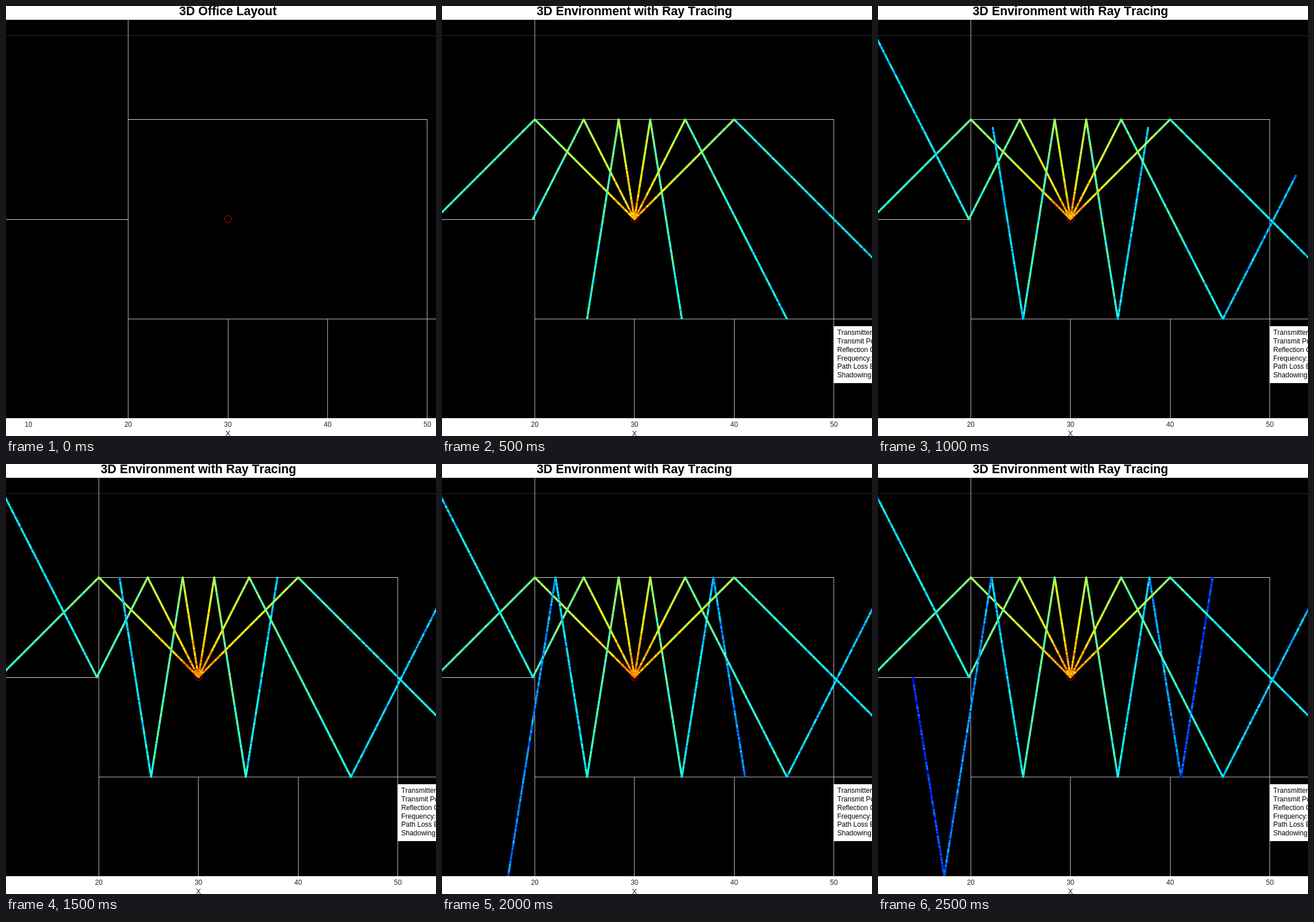
An HTML page with a canvas that plays this animation: 748x748 px, repeating every 3 s.

```html
<!DOCTYPE html>
<html lang="en">
<head>
<meta charset="utf-8">
<title>Ray tracing in an office layout</title>
<style>
  html, body { margin: 0; width: 100%; height: 100%; overflow: hidden; background: #fff; }
  canvas { display: block; width: 748px; height: 748px; }
</style>
</head>
<body>
<canvas id="stage" width="748" height="748"></canvas>
<script>
const ctx = document.getElementById('stage').getContext('2d');
const SIZE = 748, STEP_MS = 500, STEPS = 6;
const UNIT = 17.345;
const PLOT_TOP = 24, TOP = 197.3, MID = 370.7, LOW = 544.2, BOTTOM = 717;
const FONT = '"Liberation Sans", Arial, sans-serif';
const tan = degrees => Math.tan(degrees * Math.PI / 180);

// Each ray advances sideways at a fixed slope and turns at these heights.
const RAYS = [
  { slope: -tan(45), turns: [TOP, LOW], loss: 0 },
  { slope: -tan(27), turns: [TOP, MID, PLOT_TOP], loss: 0 },
  { slope: -tan(9), turns: [TOP, LOW, TOP, BOTTOM, MID], loss: 0 },
  { slope: tan(9), turns: [TOP, LOW, TOP, LOW, TOP], loss: 0 },
  { slope: tan(27), turns: [TOP, LOW, TOP], loss: 0.02 },
  { slope: tan(45), turns: [TOP, LOW], loss: 0.05 }
];

// Visible segments, reach in pixels and colour shift per step.
const STAGES = [
  null,
  { segments: 2, reach: Infinity, shift: -0.025 },
  { segments: 3, reach: 864.4, shift: -0.02 },
  { segments: 3, reach: Infinity, shift: 0 },
  { segments: 4, reach: Infinity, shift: -0.005 },
  { segments: 5, reach: Infinity, shift: -0.005 }
];

const LEGEND = ['Transmitter Height: 1 m', 'Transmit Power: 20 dBm', 'Reflection Coefficient: 0.7',
  'Frequency: 2.4 GHz', 'Path Loss Exponent: 2', 'Shadowing Deviation: 3 dB'];

function seeded(seed) {
  return () => {
    seed = (seed + 0x6D2B79F5) | 0;
    let t = Math.imul(seed ^ (seed >>> 15), 1 | seed);
    t = (t + Math.imul(t ^ (t >>> 7), 61 | t)) ^ t;
    return ((t ^ (t >>> 14)) >>> 0) / 4294967296;
  };
}

function jet(v) {
  const channel = peak => Math.round(255 * Math.max(0, Math.min(1, 1.5 - Math.abs(4 * v - peak))));
  return `rgb(${channel(3)},${channel(2)},${channel(1)})`;
}

function text(str, x, y, size, color, align = 'center', weight = 'normal') {
  ctx.font = `${weight} ${size}px ${FONT}`;
  ctx.fillStyle = color;
  ctx.textAlign = align;
  ctx.fillText(str, x, y);
}

function rect(x, y, w, h, color) {
  ctx.fillStyle = color;
  ctx.fillRect(x, y, w, h);
}

function drawPlan(originX) {
  const px = x => Math.floor(originX + (x - 30) * UNIT);
  const across = (x1, x2, y, color) => rect(x1, y, x2 - x1, 1, color);
  const down = (x, y1, y2) => rect(px(x), y1, 1, y2 - y1, '#b8b8b8');

  rect(0, PLOT_TOP, SIZE, BOTTOM - PLOT_TOP, '#000');
  across(0, SIZE, 51, '#2b2b2b');
  down(20, PLOT_TOP, BOTTOM);
  down(30, 544, BOTTOM);
  down(40, 544, BOTTOM);
  down(50, 197, BOTTOM);
  across(px(20), px(50) + 1, 197, '#d8d8d8');
  across(0, px(20), 371, '#d8d8d8');
  across(px(20), SIZE, 544, '#b8b8b8');

  for (let x = 10; x <= 50; x += 10) {
    const labelX = originX + (x - 30) * UNIT;
    if (labelX > 0) text(x, labelX, 732, 12, '#262626');
  }
  text('X', originX, 748, 13, '#262626');

  ctx.strokeStyle = '#d00000';
  ctx.lineWidth = 1;
  ctx.beginPath();
  ctx.arc(originX, MID, 6, 0, Math.PI * 2);
  ctx.stroke();
}

function drawRay(ray, originX, stage, random) {
  const stretch = Math.hypot(1, ray.slope);
  const spacing = UNIT / 10;
  let x = originX, y = MID, travelled = 0;

  ray.turns.slice(0, stage.segments).forEach((turn, bounces) => {
    const height = Math.abs(turn - y), dir = Math.sign(turn - y);
    const length = Math.min(height * stretch, stage.reach - travelled);
    for (let s = 0; s <= length; s += spacing) {
      const distance = Math.max(2, (travelled + s) / UNIT);
      const noise = (random() + random() + random() - 1.5) * 0.1;
      const level = 0.8 - 0.23 * Math.log10(distance) - 0.04 * bounces
        - (bounces ? ray.loss : 0) + stage.shift + noise;
      const rise = s / stretch;
      ctx.fillStyle = jet(level);
      ctx.beginPath();
      ctx.arc(x + rise * ray.slope, y + rise * dir, 1.85, 0, Math.PI * 2);
      ctx.fill();
    }
    x += height * ray.slope;
    y = turn;
    travelled += height * stretch;
  });
}

function drawLegend() {
  rect(681, 557, SIZE - 681, 99, '#fff');
  LEGEND.forEach((line, i) => text(line, 687.5, 572 + i * 14.85, 12, '#000', 'left'));
}

function drawStep(step) {
  const stage = STAGES[step];
  const originX = stage ? 334.8 : 386;
  const title = stage ? '3D Environment with Ray Tracing' : '3D Office Layout';
  ctx.fontKerning = 'none';
  rect(0, 0, SIZE, SIZE, '#fff');
  text(title, originX, 16, 21.33, '#000', 'center', 'bold');
  drawPlan(originX);
  if (!stage) return;

  ctx.save();
  ctx.beginPath();
  ctx.rect(0, PLOT_TOP, SIZE, BOTTOM - PLOT_TOP);
  ctx.clip();
  RAYS.forEach((ray, i) => drawRay(ray, originX, stage, seeded(step * 101 + i * 17)));
  ctx.restore();
  drawLegend();
}

let shown = -1;
const start = performance.now();
function tick() {
  const step = Math.floor((performance.now() - start) / STEP_MS) % STEPS;
  if (step !== shown) {
    shown = step;
    drawStep(step);
  }
  requestAnimationFrame(tick);
}
tick();
</script>
</body>
</html>
```
